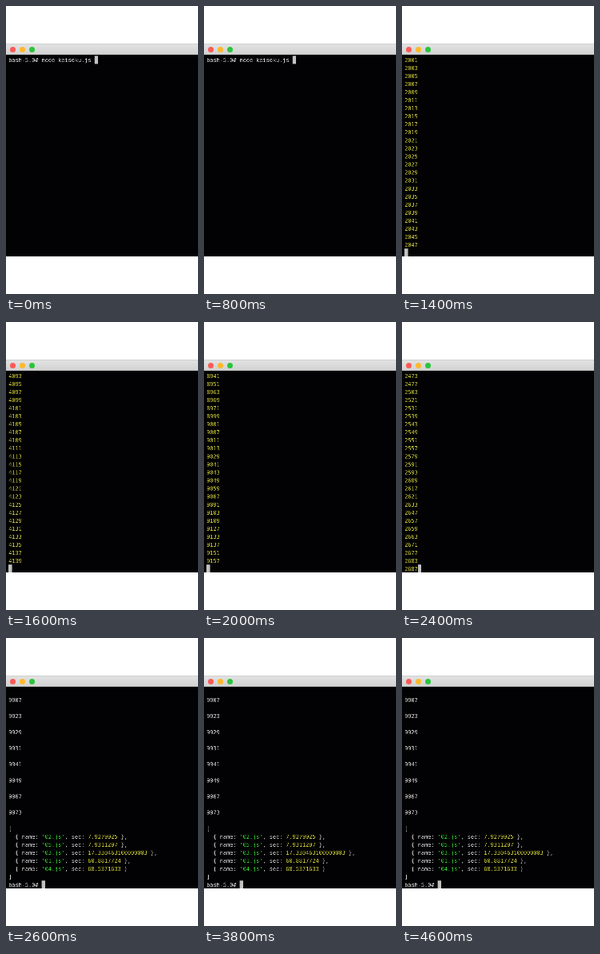
Write an HTML page with a canvas that moves like this. It is 240 px wide and 360 px high and loops after 4800 ms.

```html
<!DOCTYPE html>
<html lang="en">
<head>
<meta charset="utf-8">
<title>Terminal timing run</title>
<style>
html, body { margin: 0; width: 100%; height: 100%; overflow: hidden; background: #fff; }
.bar {
  position: absolute; top: 47px; width: 240px; height: 14px; box-sizing: border-box;
  background: linear-gradient(#e2e2e2, #d2d2d2);
  border-top: 1px solid #cfcfcf; border-bottom: 1px solid #b8b8b8;
}
.bar i { position: absolute; top: 2.6px; width: 7px; height: 7px; border-radius: 50%; }
.close { left: 5px; background: #fb5b55; }
.minimize { left: 16.8px; background: #fcb92c; }
.zoom { left: 28.5px; background: #2ac43c; }
canvas { position: absolute; left: 0; top: 61px; width: 240px; height: 252px; }
</style>
</head>
<body>
<div class="bar"><i class="close"></i><i class="minimize"></i><i class="zoom"></i></div>
<canvas id="screen" width="960" height="1008"></canvas>
<script>
const LOOP = 4800;
const SCALE = 4; // drawn large and shown small, for soft text like a scaled recording
const CELL = { left: 3.25, top: 1.4, width: 4.13, height: 10.04, baseline: 7.6 };
const BLACK = '#020103', GRAY = '#d0d0d0', YELLOW = '#c6c638', GREEN = '#2fc92f', CURSOR = '#c0c3c0';

const isOdd = n => n % 2 === 1;
const isPrime = n => {
  for (let d = 2; d * d <= n; d++) if (n % d === 0) return false;
  return n > 1;
};

// The last `count` matching numbers, ending at `last`.
function numbers(last, count, test) {
  const found = [];
  for (let n = last; found.length < count; n--) if (test(n)) found.unshift(String(n));
  return found;
}

// A line is a list of [text, color] runs; the cursor follows the last line.
const line = (text, color = GRAY) => [[text, color]];
const yellowLines = (last, count, test) => numbers(last, count, test).map(n => line(n, YELLOW));
const scrolled = (last, test) => [...yellowLines(last, 24, test), line('')];
const midLine = last => yellowLines(last, 25, isPrime);
const prompt = 'bash-5.0# ';

const results = [
  ['02', '7.9279925'], ['05', '7.9311297'], ['03', '17.330463100000003'],
  ['01', '60.8817724'], ['04', '68.5371633']
].map(([file, sec], i, all) => [
  ['  { name: ', GRAY], [`'${file}.js'`, GREEN], [', sec: ', GRAY], [sec, YELLOW],
  [i < all.length - 1 ? ' },' : ' }', GRAY]
]);

const summary = [
  ...numbers(9973, 8, isPrime).flatMap(n => [line(''), line(n)]),
  line(''), line('['), ...results, line(']'), line(prompt)
];

const timeline = [
  [0, [line(prompt + 'node keisoku.js ')]],
  [1400, scrolled(2047, isOdd)],
  [1600, scrolled(4139, isOdd)],
  [1800, scrolled(4999, isPrime)],
  [2000, scrolled(9157, isPrime)],
  [2200, midLine(977)],
  [2400, midLine(2687)],
  [2600, summary]
];

const ctx = document.getElementById('screen').getContext('2d');
ctx.scale(SCALE, SCALE);
ctx.font = '6.86px "DejaVu Sans Mono", monospace';

function drawScreen(lines) {
  ctx.fillStyle = BLACK;
  ctx.fillRect(0, 0, 240, 252);
  let x, y;
  lines.forEach((runs, row) => {
    x = CELL.left;
    y = CELL.top + row * CELL.height;
    for (const [text, color] of runs) {
      ctx.fillStyle = color;
      ctx.fillText(text, x, y + CELL.baseline);
      x += text.length * CELL.width;
    }
  });
  ctx.fillStyle = CURSOR;
  ctx.fillRect(x, y, 4.3, CELL.height);
}

const start = performance.now();
let shown = null;

function tick(now) {
  const time = Math.max(0, now - start) % LOOP;
  const current = timeline.filter(([at]) => at <= time).pop();
  if (current !== shown) {
    drawScreen(current[1]);
    shown = current;
  }
  requestAnimationFrame(tick);
}
tick(start);
</script>
</body>
</html>
```
